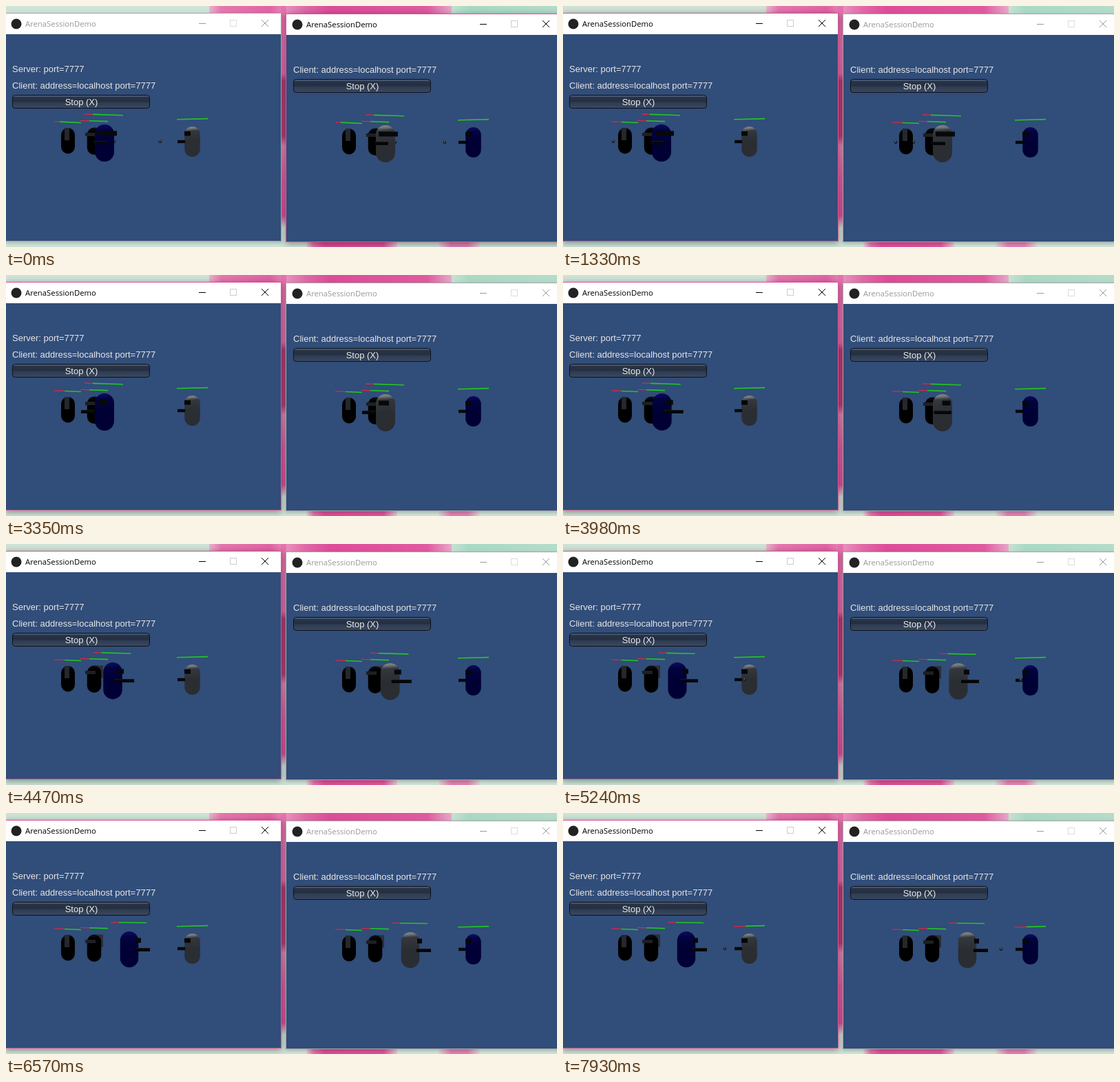
Recreate the animation shown at these times as an HTML page with a canvas. Size 800x350 px, loop 8000 ms.

```html
<!DOCTYPE html>
<html>
<head>
<meta charset="utf-8">
<style>
html, body { margin: 0; width: 800px; height: 350px; overflow: hidden; background: #cfe3d7; }
canvas { display: block; }
</style>
</head>
<body>
<canvas id="stage" width="800" height="350"></canvas>
<script>
const c = document.getElementById('stage').getContext('2d');
const LOOP = 8000, FOCUS = 1000;
const GREY = ['#7b7e81', '#34373b', '#2a2d32'];
const BLUE = ['#0a0a58', '#030340', '#000034'];
const BLACK = ['#0b0c0e', '#000', '#000'];

// time, body centre, gun left/right, visor left/right (relative to the centre)
const WALK = [
  [0, 143, -16, 4, -10, 18],
  [2090, 143, -16, 4, -10, 18],
  [2800, 143, -34, -15, -10, 5],
  [3450, 143, -34, -15, -10, 5],
  [3950, 143, 2, 31, 6, 16],
  [4470, 155, 2, 31, 6, 16],
  [4950, 166, 4, 30, 8, 16],
  [5450, 166, 4, 30, 8, 16],
  [6010, 179, 9, 30, 10, 17],
  [LOOP, 179, 9, 30, 10, 17]
];
const SHOT_LEFT = [[0, 224], [1330, 73], [1890, 50]];
const SHOT_RIGHT = [[0, 229], [1330, 75], [1890, 55]];

function track(keys, t) {
  let i = 1;
  while (i < keys.length - 1 && t > keys[i][0]) i++;
  const a = keys[i - 1], b = keys[i];
  const k = Math.max(0, Math.min(1, (t - a[0]) / (b[0] - a[0])));
  return a.slice(1).map((v, j) => v + (b[j + 1] - v) * k);
}

function rect(x, y, w, h, fill) {
  c.fillStyle = fill;
  c.fillRect(x, y, w, h);
}

function ramp(x0, y0, x1, y1, stops) {
  const g = c.createLinearGradient(x0, y0, x1, y1);
  stops.forEach(([p, col]) => g.addColorStop(p, col));
  return g;
}

function text(s, x, y, font, fill, align = 'left') {
  c.font = font;
  c.fillStyle = fill;
  c.textAlign = align;
  c.fillText(s, x, y);
}

function desktop() {
  rect(0, 0, 800, 350, '#cfe3d7');
  rect(640, 0, 160, 12, ramp(640, 0, 800, 0, [[0, '#cfe3d7'], [.2, '#a9d9c3'], [1, '#b4dcca']]));
  rect(295, 0, 352, 12, ramp(295, 0, 647, 0, [
    [0, '#e9b3cd'], [.05, '#e577ae'], [.25, '#e263a4'], [.32, '#e88fbb'],
    [.4, '#e068a6'], [.5, '#dd4c98'], [.9, '#e05aa0'], [1, '#e7a9c8']]));
  rect(399, 0, 8, 350, ramp(0, 0, 0, 350, [
    [0, '#e573ae'], [.28, '#e168a6'], [.31, '#b5396f'], [.54, '#b83c73'],
    [.58, '#d884ac'], [.72, '#dd5c9c'], [.87, '#db4f96'], [.92, '#cfe0d5'], [1, '#cfe3d7']]));
  rect(436, 341, 132, 9, ramp(436, 0, 568, 0, [
    [0, '#dcd3d5'], [.08, '#e070a8'], [.2, '#dc4a95'], [.85, '#de5199'], [1, '#e0c6d1']]));
  rect(628, 341, 60, 9, ramp(628, 0, 688, 0, [
    [0, '#d8d6d6'], [.3, '#e07fae'], [.7, '#e07fae'], [1, '#d8d6d6']]));
}

function button(x, y) {
  c.beginPath();
  c.roundRect(x + .5, y + .5, 199, 19, 4);
  c.fillStyle = ramp(0, y, 0, y + 20, [
    [0, '#55647a'], [.12, '#45536a'], [.18, '#273346'], [.5, '#242f42'], [.55, '#2e3b51'], [1, '#3b4961']]);
  c.fill();
  c.strokeStyle = '#0c1119';
  c.lineWidth = 1;
  c.stroke();
  text('Stop (X)', x + 100.5, y + 15, '13px "Liberation Sans", Arial, sans-serif', '#ececec', 'center');
}

function frame(active) {
  c.save();
  c.shadowColor = active ? 'rgba(0,0,0,.4)' : 'rgba(0,0,0,.22)';
  c.shadowBlur = active ? 9 : 5;
  c.shadowOffsetY = 2;
  rect(-2, 10, 402, 332, active ? '#d9579c' : '#a9a6a9');
  c.restore();
  rect(-1, 11, 400, 30, '#fff');
  rect(-1, 41, 400, 300, '#314d79');

  c.fillStyle = '#222';
  c.beginPath();
  c.arc(15, 26, 7.5, 0, 7);
  c.fill();
  const ink = active ? '#000' : '#999';
  text('ArenaSessionDemo', 28, 30, '11.3px "Open Sans", "Noto Sans", sans-serif', ink);

  c.strokeStyle = ink;
  c.lineWidth = 1;
  c.beginPath();
  c.moveTo(280, 25.5);
  c.lineTo(290, 25.5);
  c.moveTo(371, 20);
  c.lineTo(381, 30);
  c.moveTo(381, 20);
  c.lineTo(371, 30);
  c.stroke();
  c.strokeStyle = active ? '#ccc' : '#ddd';
  c.strokeRect(325.5, 20.5, 9, 9);
}

function capsule(cx, top, w, h, [hi, mid, low]) {
  c.beginPath();
  c.roundRect(cx - w / 2, top, w, h, w / 2);
  c.fillStyle = ramp(cx - 2, top, cx + 2, top + h, [[0, hi], [.05, hi], [.15, mid], [.5, low], [1, low]]);
  c.fill();
}

// a thin wedge: the damaged end is narrower
function bar(x0, y0, x1, y1, hurt) {
  const part = (a, b, fill, h) => {
    const y = x => y0 + (y1 - y0) * (x - x0) / (x1 - x0);
    c.strokeStyle = fill;
    c.lineWidth = h;
    c.beginPath();
    c.moveTo(a, y(a));
    c.lineTo(b, y(b));
    c.stroke();
  };
  part(x0 + hurt, x1, '#20c820', 1.6);
  if (hurt) part(x0, x0 + hurt, '#d8284a', 1.3);
}

function bullet(x) {
  c.fillStyle = '#1d2128';
  c.beginPath();
  c.arc(x, 196.8, 2.4, 0, 7);
  c.fill();
  rect(x - 1, 195, 1.5, 1.5, '#777b80');
}

function bullets(t, right) {
  const lag = right ? 60 : 0;
  const fly = (from, x, end) => {
    if (t >= from + lag && t < end) bullet(x + .113 * (t - lag - from));
  };
  fly(4600, 191, 6600);
  fly(6785, 211, 7130);
  fly(7720, 211, LOOP);
}

function scene(t, right) {
  const mine = right ? GREY : BLUE, other = right ? BLUE : GREY;
  const [cx, gl, gr, vl, vr] = track(WALK, right ? t - 230 : t);
  const far = (cx - 143) / 36;

  bar(70, 167.8, 109, 169.5, t < 500 ? 8 : 15);
  bar(108, 166.4, 148, 167.6, 13);
  bar(cx - 29 + 2 * far, 157 + 1.8 * far, cx + 27 - 2 * far, 158.7 + .8 * far, 12);
  bar(248, 164.8, 293, 163.6, t < 7130 ? 0 : 17);

  if (t < 1890) bullet(track(right ? SHOT_RIGHT : SHOT_LEFT, t)[0]);
  if (t < 1680) bullet(track([[0, 157], [1330, right ? 101 : 98], [1680, 90]], t)[0]);

  capsule(90, 177, 20, 37.5, BLACK);
  rect(85, 177, 7, 18, '#25282c');

  rect(129, 176.5, 12, 18, '#2b2f37');
  capsule(128, 176.5, 20.5, 39.5, BLACK);
  rect(115, 184, 15, 5, '#1d1f22');

  const gun = () => {
    rect(cx + gl, 196, gr - gl, 5, '#050608');
    rect(cx + gl, 196, gr - gl, 1, '#15171a');
  };
  const behind = gr < -8;
  if (behind) gun();
  capsule(cx, 172, 28 - 1.5 * far, 54 - 1.8 * far, mine);
  rect(cx + vl, 181.5, vr - vl, 7, '#07080a');
  if (!behind) gun();

  capsule(270.5, 175, 22.5, 44, other);
  rect(259, 182, 9, 6.5, '#060709');
  rect(249, 194.8, 11, 4.4, '#060709');
  bullets(t, right);
}

function panel(t, right) {
  c.save();
  if (right) c.translate(408, 1);
  frame(right === (t < FOCUS));
  c.beginPath();
  c.rect(-1, 41, 400, 300);
  c.clip();
  const font = '13px "Liberation Sans", Arial, sans-serif';
  if (!right) text('Server: port=7777', 9, 96, font, '#e6e6e6');
  text('Client: address=localhost port=7777', 9, right ? 96 : 120, font, '#e6e6e6');
  button(9, right ? 105 : 129);
  scene(t, right);
  c.restore();
}

function draw(now) {
  const t = now % LOOP;
  desktop();
  panel(t, false);
  panel(t, true);
  requestAnimationFrame(draw);
}
requestAnimationFrame(draw);
</script>
</body>
</html>
```
